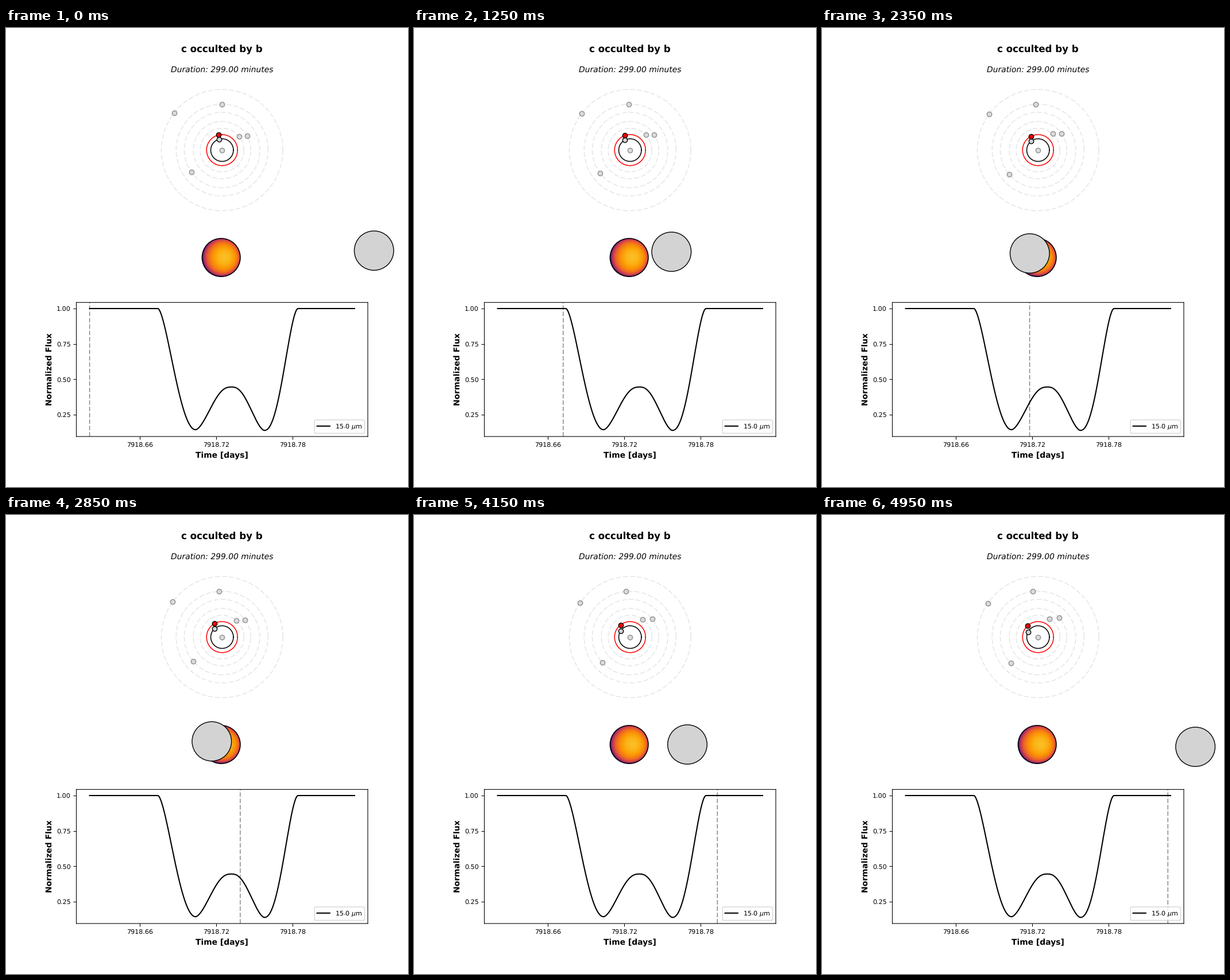
A matplotlib script for the animation above (5000 ms loop, 700 px wide and 800 px high).

```python
import numpy as np
import matplotlib.pyplot as plt
from matplotlib.animation import FuncAnimation
from matplotlib.patches import Circle

plt.rcParams.update({
    "font.family": "DejaVu Sans",
    "text.hinting": "none",
    "path.snap": False,
})

W, H = 700, 800
FRAMES, INTERVAL = 100, 50
MINUTES, DAY = 299, 1440
T0 = 7918.62079
HUB = np.array([376.25, 212.8])
ORBIT_SCALE = 14.97
DASHES = (0, (5.55, 2.4))

# name: (period in days, start angle in degrees)
PLANETS = {
    "d": (4.0498, 39.6),
    "e": (6.0996, 29.85),
    "f": (9.2067, 215.8),
    "g": (12.353, 90.3),
    "h": (18.767, 142.0),
    "b": (1.5109, 104.7),
    "c": (2.4218, 102.4),
}

# Retrograde loop of the occulting disk: a smooth curve through a few poses
path_x = np.poly1d(np.polyfit([0, 110, 170, 248, 296],
                              [640.8, 388.8, 358.3, 476, 650.2], 4))


def path_y(minute):
    return 388 + 0.0175 * minute + 0.000124 * minute ** 2


def flux(minute):
    """Two dips with a partial recovery; each side eases from dip to crest."""
    y = np.ones_like(minute)
    first, second = (119.5, 0.143), (197.3, 0.138)
    sides = [(first, (77.1, 1), 2, 1.7), (first, (160, 0.445), 1.7, 2.7),
             (second, (160, 0.445), 1.7, 2.7), (second, (235.2, 1), 2.2, 1.9)]
    for (m0, y0), (m1, y1), a, b in sides:
        s = (minute - m0) / (m1 - m0)
        inside = (s >= 0) & (s <= 1)
        y[inside] = y0 + (y1 - y0) * (1 - (1 - s[inside] ** a) ** b)
    return y


def orbit_radius(name):
    return ORBIT_SCALE * PLANETS[name][0] ** (2 / 3)


def orbit_point(name, minute):
    period, start = PLANETS[name]
    a = np.radians(start + 360 * minute / DAY / period)
    return HUB + orbit_radius(name) * np.array([np.cos(a), -np.sin(a)])


def draw_orbits(ax):
    a = np.linspace(0, 2 * np.pi, 400)
    faint = dict(color="k", alpha=0.1, ls=DASHES)
    styles = {"b": dict(color="k"), "c": dict(color="r")}
    for name in PLANETS:
        r = orbit_radius(name)
        ax.plot(HUB[0] + r * np.cos(a), HUB[1] - r * np.sin(a), lw=1.1,
                **styles.get(name, faint))


def add_dot(ax, name=None):
    face, edge = {"b": ("lightgrey", "k"), "c": ("r", "k")}.get(
        name, ("#dbdbdb", "#8f8f8f"))
    return ax.plot(*HUB, "o", ms=6, mfc=face, mec=edge, mew=1, zorder=4)[0]


def draw_hot_disk(ax, cx, cy, r):
    u = np.linspace(-1, 1, 240)
    x, y = np.meshgrid(u, u)
    z = np.sqrt(np.clip(1 - x * x - y * y, 0, 1))
    tilt = np.radians(11)
    sun = np.clip(x * np.sin(tilt) + z * np.cos(tilt), 0, 1)
    img = ax.imshow(0.85 * np.sqrt(sun), cmap="inferno", vmin=0, vmax=1,
                    extent=(cx - r, cx + r, cy + r, cy - r), aspect="auto", zorder=5)
    img.set_clip_path(Circle((cx, cy), r, transform=ax.transData))
    ax.add_patch(Circle((cx, cy), r - 0.2, fill=False, ec="k", lw=1.1, zorder=6))


def draw_chart(ax):
    minute = np.linspace(0, MINUTES, 900)
    ax.plot(T0 + minute / DAY, flux(minute), color="k", lw=1.5,
            label=r"15.0 $\mu\mathrm{m}$")
    margin = 0.05 * MINUTES / DAY
    ax.set_xlim(T0 - margin, T0 + MINUTES / DAY + margin)
    ax.set_ylim(0.0949, 1.0431)
    ax.set_xticks([7918.66, 7918.72, 7918.78])
    ax.set_yticks([0.25, 0.5, 0.75, 1])
    ax.xaxis.set_major_formatter("{x:.2f}")
    ax.yaxis.set_major_formatter("{x:.2f}")
    ax.tick_params(labelsize=8)
    ax.set_xlabel("Time [days]", fontsize=10, fontweight="bold")
    ax.set_ylabel("Normalized Flux", fontsize=10, fontweight="bold")
    ax.legend(loc="lower right", fontsize=8)


fig = plt.figure(figsize=(W / 100, H / 100), dpi=100, facecolor="w")
chart = fig.add_axes([0.175, 0.11, 0.725, 0.29207])
draw_chart(chart)
tracker = chart.axvline(T0, color="k", alpha=0.5, lw=1, ls=DASHES)

stage = fig.add_axes([0, 0, 1, 1])
draw_orbits(stage)
draw_hot_disk(stage, 374.7, 400, 33.5)
stage.set_xlim(0, W)
stage.set_ylim(H, 0)
stage.axis("off")
stage.text(HUB[0], 42, "c occulted by b", ha="center", va="baseline",
           fontsize=12, fontweight="bold")
stage.text(HUB[0], 77, "Duration: 299.00 minutes", ha="center", va="baseline",
           fontsize=10, fontstyle="italic")

add_dot(stage)
dots = {name: add_dot(stage, name) for name in PLANETS}
occulter = stage.add_patch(Circle((0, 0), 34.3, fc="lightgrey", ec="k", lw=1, zorder=7))


def update(frame):
    minute = max(0, 3 * frame - 1)
    t = T0 + minute / DAY
    tracker.set_xdata([t, t])
    for name, dot in dots.items():
        x, y = orbit_point(name, minute)
        dot.set_data([x], [y])
    occulter.center = path_x(minute), path_y(minute)
    return [tracker, occulter, *dots.values()]


anim = FuncAnimation(fig, update, frames=FRAMES, interval=INTERVAL,
                     repeat=True, repeat_delay=0, blit=False)
plt.show()
```
